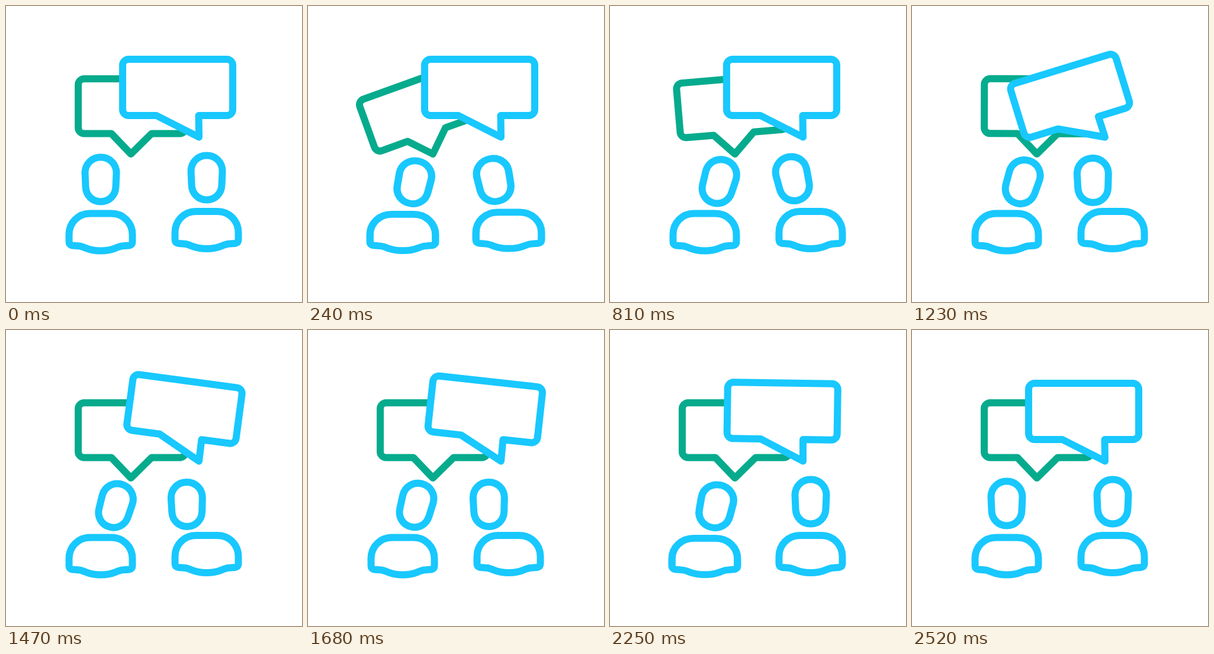
These frames come from a looping animation (500x500 px, 4550 ms). An HTML page:

```html
<!DOCTYPE html>
<html lang="en">
<head>
<meta charset="utf-8">
<title>Conversation</title>
<style>
html, body { margin: 0; width: 100%; height: 100%; overflow: hidden; background: #fff; }
svg { display: block; width: 100%; height: 100%; }
path { fill: none; stroke: #18c8ff; stroke-width: 12; stroke-linejoin: round; }
.bubble { fill: #fff; }
#back { stroke: #06ab8d; }
</style>
</head>
<body>
<svg viewBox="0 0 500 500">
  <defs>
    <path id="head" d="M-26.5-11C-26.5-26-15-37.5 0-37.5S26.5-26 26.5-11L25.5 12C25 27 14 37.5 0 37.5S-25 27-25.5 12Z"/>
    <path id="body" d="M0 31.5C-12 31.5-19 29.5-25 27Q-33 23.5-38 23.3L-48 22.5Q-53.5 21.5-53.5 16V4C-53.5-16-38-31.5-18-31.5H18C38-31.5 53.5-16 53.5 4V16Q53.5 21.5 48 22.5L38 23.3Q33 23.5 25 27C19 29.5 12 31.5 0 31.5Z"/>
  </defs>
  <path id="back" class="bubble" d="M132 123H293.500a10 10 0 0 1 10 10V205.500a10 10 0 0 1-10 10H246L211 250 178 215.500H132a10 10 0 0 1-10-10V133a10 10 0 0 1 10-10Z"/>
  <path id="front" class="bubble" d="M207 90H373a10 10 0 0 1 10 10V175a10 10 0 0 1-10 10H325.500L326 221.500 254 185H207a10 10 0 0 1-10-10V100a10 10 0 0 1 10-10Z"/>
  <use id="bodyL" href="#body"/>
  <use id="bodyR" href="#body"/>
  <use id="headL" href="#head"/>
  <use id="headR" href="#head"/>
</svg>
<script>
const LOOP = 4550, STEP = 30, FRONT_START = 1080, NECK = 89;

const progress = (t, from, to) => Math.min(1, Math.max(0, (t - from) / (to - from)));
const move = (t, from, to) => (1 - Math.cos(Math.PI * progress(t, from, to))) / 2;
const bump = (t, from, to) => Math.sin(Math.PI * progress(t, from, to));

// A bubble rocks on its tip, less with every turn
function swing(t) {
  return -21 * move(t, 0, 210)
    + 36.5 * move(t, 210, 470)
    - 24.2 * move(t, 530, 695)
    + 10.7 * move(t, 695, 975)
    - 2 * move(t, 1060, 1260);
}

function place(id, transform) {
  document.getElementById(id).setAttribute("transform", transform);
}

function person(side, x, y, headX, headY, tilt, squash) {
  const scale = `scale(${1 + squash * 0.045} ${1 - squash * 0.035})`;
  place("head" + side, `translate(${headX} ${headY + 3.5 * squash}) rotate(${tilt}) ${scale}`);
  place("body" + side, `translate(${x} ${y + 0.7 * squash}) ${scale}`);
}

function left(t) {
  const tilt = 15 * (move(t, 0, 330) - move(t, 2160, 2490)) + 2.5 * bump(t, 700, 1650);
  const a = tilt * Math.PI / 180;
  const squash = bump(t, 0, 330) + bump(t, 2160, 2490);
  person("L", 160, 382, 160 + NECK * Math.sin(a), 382 - NECK * Math.cos(a), tilt, squash);
}

function right(t) {
  const lean = move(t, 0, 330), rise = move(t, 720, 1200), back = move(t, 1750, 2160);
  const x = 339 - 30 * lean - 3.5 * rise + 33.5 * back;
  const y = 290 + 1.5 * lean + 3 * rise - 4.5 * back;
  const tilt = -14 * lean + 13 * rise + back;
  person("R", 339, 378.5, x, y, tilt, bump(t, 0, 330) + bump(t, 1750, 2160));
}

function draw(now) {
  const t = Math.floor(now % LOOP / STEP) * STEP;
  place("back", `rotate(${swing(t)} 211 250)`);
  place("front", `rotate(${swing(t - FRONT_START)} 326 221.5)`);
  left(t);
  right(t);
}

let start;
function tick(now) {
  start ??= now;
  draw(now - start);
  requestAnimationFrame(tick);
}
draw(0);
requestAnimationFrame(tick);
</script>
</body>
</html>
```
